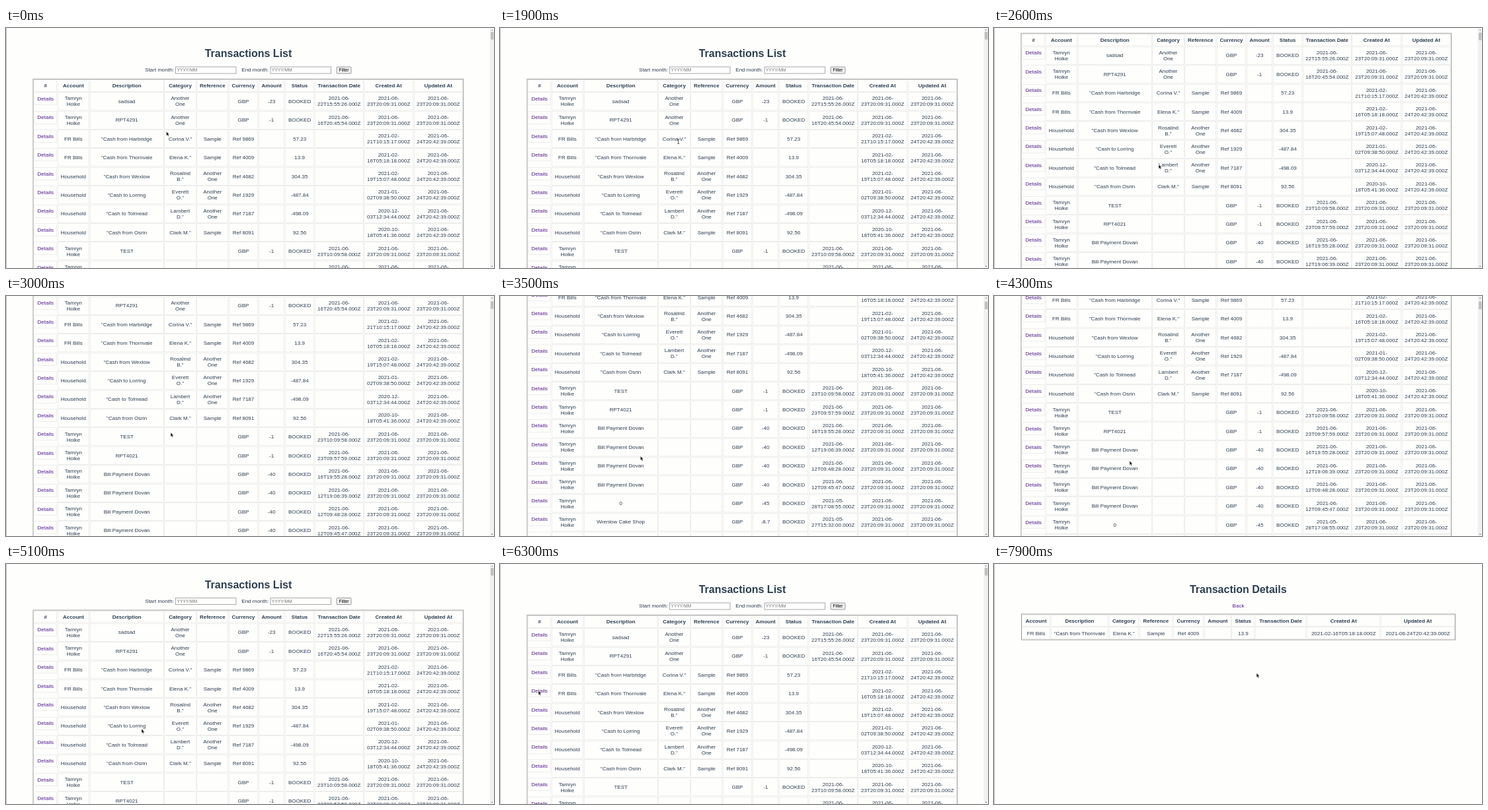
An HTML page that plays this animation: 738x364 px, repeating every 8000 ms.

```html
<!DOCTYPE html>
<html lang="en">
<head>
<meta charset="utf-8">
<title>Transactions</title>
<style>
  html, body { margin: 0; width: 100%; height: 100%; overflow: hidden; background: #fefefd; }
  /* Laid out at double size, shown at half. */
  #stage { position: absolute; width: 1476px; height: 728px; overflow: hidden;
    transform: scale(.5); transform-origin: 0 0; background: #fefefd;
    color: #2c3e50; font: 16px/18px "Liberation Sans", Arial, sans-serif; }
  #stage div { position: absolute; box-sizing: border-box; }
  .page { inset: 0; }
  .text { display: flex; align-items: center; justify-content: center; text-align: center; white-space: pre; }
  .left { justify-content: flex-start; }
  .cell { border: 1px solid #dedddc; }
  .head { font-weight: bold; }
  .title { font-size: 32px; font-weight: bold; }
  .link { color: #551a8b; }
  .frame { border: 2px solid #a0a0a0; }
  .input { border: 2px solid #a8a8a8; background: #fff; color: #757575; font-size: 13.33px; padding-left: 3px; }
  .button { border: 2px solid #999; border-radius: 3px; background: #efefef; color: #000; font-size: 13.33px; }
  .edge { background: #777; }
  .track { background: #f1f1f1; }
  .thumb { background: #c1c1c1; }
  .up { background: #a3a3a3; clip-path: polygon(50% 0, 100% 100%, 0 100%); }
  .down { background: #505050; clip-path: polygon(0 0, 100% 0, 50% 100%); }
  #cursor { position: absolute; left: 0; top: 0; overflow: visible; }
</style>
</head>
<body>
<div id="stage">
  <div id="list" class="page"><div id="scroller" class="page"></div></div>
  <div id="details" class="page"></div>
  <svg id="cursor" width="20" height="24">
    <path id="arrow" d="M0 0V13L3 10.3L5.2 15.2L7.6 14.2L5.4 9.4H9.4Z" fill="#111" stroke="#fff" stroke-width="1"/>
    <path id="beam" d="M-3 -7Q0 -7 0 -5Q0 -7 3 -7M0 -5V5M-3 7Q0 7 0 5Q0 7 3 7" fill="none" stroke="#222" stroke-width="1.6"/>
  </svg>
</div>
<script>
const $ = id => document.getElementById(id);
const stage = $('stage'), list = $('list'), scroller = $('scroller'), details = $('details');

// Coordinates are in visible pixels.
function box(parent, cls, x, y, w, h, text = '') {
  const el = document.createElement('div');
  el.className = cls;
  el.textContent = text;
  Object.assign(el.style, { left: 2 * x + 'px', top: 2 * y + 'px', width: 2 * w + 'px', height: 2 * h + 'px' });
  parent.append(el);
  return el;
}

function tableRow(parent, bounds, y, h, texts, cls = '') {
  texts.forEach((text, i) => {
    const isLink = text === 'Details';
    box(parent, `text cell ${cls} ${isLink ? 'link' : ''}`,
      bounds[i] + .5, y, bounds[i + 1] - bounds[i] - 1, isLink ? 19.4 : h, text);
  });
}

const HEADERS = ['Account', 'Description', 'Category', 'Reference', 'Currency', 'Amount',
  'Status', 'Transaction Date', 'Created At', 'Updated At'];
const PITCH = 28.4, FIRST_ROW = 97.5;
const UPDATED = '2021-06-24T20:42:39', IMPORTED = '2021-06-23T20:09:31';
const stamp = s => s && s + '.000Z';
const wrapped = s => stamp(s).replace(/^(.{8})/, '$1\n');

const booked = (description, amount, date, category = '') =>
  ['Tamryn\nHolke', description, category, '', 'GBP', amount, 'BOOKED', '2021-' + date, IMPORTED, IMPORTED];
const cash = (account, description, category, reference, ref, value, created) =>
  [account, '"Cash ' + description, category + '"', reference, 'Ref ' + ref, '', value, '', created, UPDATED];

const ANOTHER = 'Another\nOne', BILL = 'Bill Payment Dovan';
const rows = [
  booked('sadsad', '-23', '06-22T15:55:26', ANOTHER),
  booked('RPT4291', '-1', '06-16T20:45:54', ANOTHER),
  cash('FR Bills', 'from Harbridge', 'Corina V.', 'Sample', 9869, '57.23', '2021-02-21T10:15:17'),
  cash('FR Bills', 'from Thornvale', 'Elena K.', 'Sample', 4009, '13.9', '2021-02-16T05:18:18'),
  cash('Household', 'from Wexlow', 'Rosalind\nB.', ANOTHER, 4682, '304.35', '2021-02-19T15:07:48'),
  cash('Household', 'to Lorring', 'Everett\nO.', ANOTHER, 1929, '-487.84', '2021-01-02T09:38:50'),
  cash('Household', 'to Tolmead', 'Lambert\nD.', ANOTHER, 7187, '-498.09', '2020-12-03T12:34:44'),
  cash('Household', 'from Osrin', 'Clark M.', 'Sample', 8091, '92.56', '2020-10-18T05:41:36'),
  booked('TEST', '-1', '06-23T10:09:58'),
  booked('RPT4021', '-1', '06-23T09:57:59'),
  booked(BILL, '-40', '06-16T19:55:28'),
  booked(BILL, '-40', '06-12T19:06:39'),
  booked(BILL, '-40', '06-12T09:48:28'),
  booked(BILL, '-40', '06-12T09:45:47'),
  booked('0', '-45', '05-28T17:08:55'),
  booked('Wrenlow Cake Shop', '-8.7', '05-27T15:32:00'),
  booked('Standing order to\nQXZT31907455555555', '-26.48', '06-21T22:40:34'),
  booked('0', '-45', '05-21T17:08:55'),
];

// List page
box(scroller, 'text title', 166, 28, 401, 21, 'Transactions List');
box(scroller, 'text left', 210.3, 58, 45, 11, 'Start month:');
box(scroller, 'text left input', 256, 58.3, 92.5, 11, 'YYYY/MM');
box(scroller, 'text left', 356.3, 58, 42, 11, 'End month:');
box(scroller, 'text left input', 399.3, 58.3, 92.5, 11, 'YYYY/MM');
box(scroller, 'text button', 499.5, 58.3, 23, 11, 'Filter');
const listBounds = [42, 77.5, 126.3, 239, 288, 336.5, 381.5, 421.7, 466.5, 541, 616.3, 691];
box(scroller, 'frame', 40.7, 77.2, 651.3, 24 + PITCH * rows.length);
tableRow(scroller, listBounds, 78.7, 18, ['#', ...HEADERS], 'head');
rows.forEach((row, i) => tableRow(scroller, listBounds, FIRST_ROW + i * PITCH, PITCH - 1,
  ['Details', ...row.slice(0, 7), ...row.slice(7).map(wrapped)]));

box(list, 'track', 731.7, 0, 6.3, 364);
box(list, 'up', 733.6, 2, 3, 2);
box(list, 'down', 733.6, 360.5, 3, 2);
const thumb = box(list, 'thumb', 732.8, 6, 4.6, 11.5);

// Details page
box(details, 'text title', 169, 28, 400.5, 21, 'Transaction Details');
box(details, 'text link', 349, 57.5, 41, 11, 'Back');
const detailBounds = [42, 85.3, 173.5, 219.3, 270.5, 317.5, 359, 394.7, 472.5, 584.7, 697.3];
box(details, 'frame', 40.9, 75.6, 657.3, 39.8);
tableRow(details, detailBounds, 77, 18, HEADERS, 'head');
tableRow(details, detailBounds, 95.6, 18.4, [...rows[3].slice(0, 7), ...rows[3].slice(7).map(stamp)]);

box(stage, 'edge', 0, 0, .5, 364);
stage.append($('cursor'));

// Keys: [time, value, ...]
const SCROLL = [[0, 0], [2100, 0], [3000, 125], [3700, 222], [3800, 220.4], [4300, 162], [5100, 7.5], [5200, 0], [8000, 0]];
const CURSOR = [[0, 242.5, 157], [900, 247, 160], [1900, 269.7, 172], [2000, 262, 186], [2200, 249, 207],
  [3000, 249, 207], [3600, 205, 250], [5200, 205, 250], [5700, 184, 244], [6300, 58, 192],
  [6700, 58, 192], [7600, 397, 165.5], [8000, 397, 165.5]];

function sample(keys, t) {
  const i = keys.findIndex(key => key[0] > t);
  const a = keys[i - 1], b = keys[i], k = (t - a[0]) / (b[0] - a[0]);
  return a.slice(1).map((v, j) => v + (b[j + 1] - v) * k);
}

const LOOP = 8000, STEP = 100;
const start = performance.now();
function draw(now) {
  const elapsed = Math.max(0, now - start) % LOOP;
  const t = Math.floor(elapsed / STEP) * STEP;
  const [scroll] = sample(SCROLL, t);
  const [x, y] = sample(CURSOR, t);
  const onDetails = t >= 6500, overText = t >= 1500 && t < 2000;
  scroller.style.transform = `translateY(${-2 * scroll}px)`;
  thumb.style.top = 2 * (6 + scroll * .014) + 'px';
  list.style.display = onDetails ? 'none' : '';
  details.style.display = onDetails ? '' : 'none';
  $('cursor').style.transform = `translate(${2 * x}px, ${2 * y}px)`;
  $('arrow').style.display = overText ? 'none' : '';
  $('beam').style.display = overText ? '' : 'none';
  requestAnimationFrame(draw);
}
draw(start);
</script>
</body>
</html>
```
